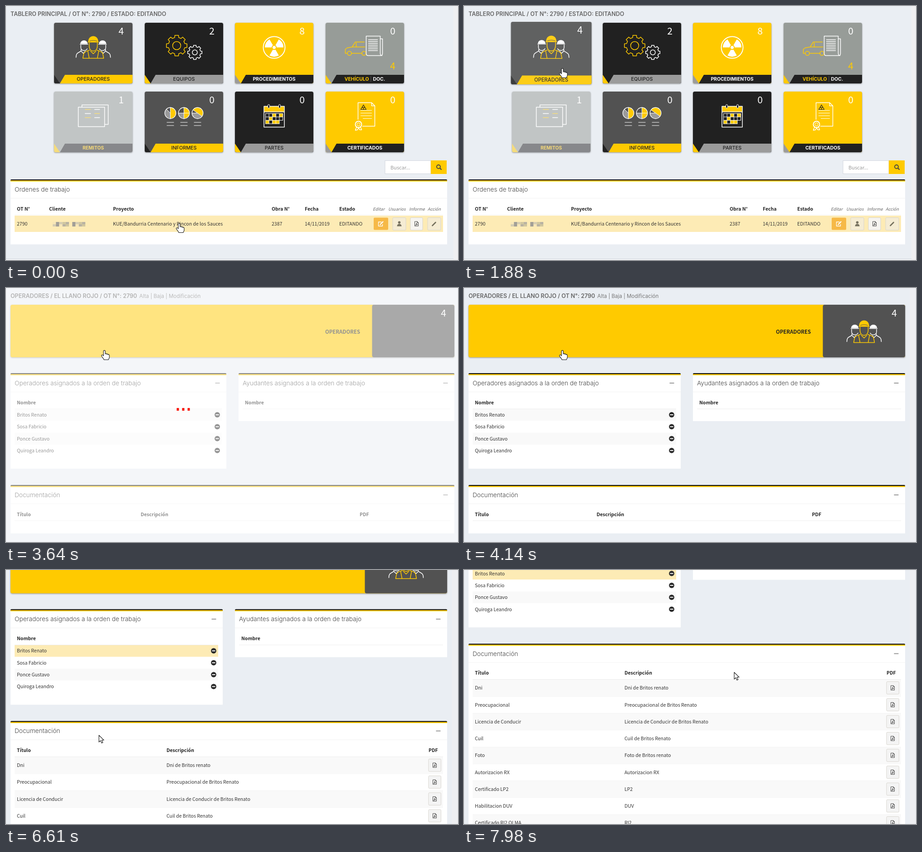
These frames come from a looping animation (997x561 px, 8000 ms). An HTML page:

```html
<!DOCTYPE html>
<html lang="es">
<head>
<meta charset="utf-8">
<title>Tablero</title>
<style>
html, body { margin: 0; width: 100%; height: 100%; overflow: hidden; background: #eaeef3; }
svg { display: block; width: 997px; height: 561px; }
text { white-space: pre; }
.s { font: 10.5px "Noto Sans CJK JP", "Noto Sans CJK SC", "Noto Sans CJK", "Open Sans", sans-serif; fill: #333; }
.b { font-weight: 700; fill: #222; }
.i { font-size: 9.4px; font-style: italic; font-weight: 500; fill: #666; }
.n { font-size: 21px; fill: #fff; text-anchor: middle; }
.o { font-size: 11.4px; }
.m { font: 300 13.7px Inter, "Open Sans", sans-serif; fill: #444; }
.h { font: 600 12.5px Inter, "Open Sans", sans-serif; fill: #666; }
.a { font: 400 11.5px Inter, "Open Sans", sans-serif; fill: #777; }
.t { font: 500 10.8px Inter, "Open Sans", sans-serif; fill: #222; text-anchor: middle; }
.w { font-size: 10.4px; font-weight: 700; }
.tile { filter: drop-shadow(0 1px 1.5px #0006); }
.line { fill: none; stroke-width: 1.5; stroke-linejoin: round; stroke-linecap: round; }
</style>
</head>
<body>
<svg id="stage" viewBox="0 0 997 561"></svg>
<script>
const YELLOW = '#ffca00', BLACK = '#212121', DARK = '#525252', GREY = '#9b9b9b', BG = '#eaeef3';
const LOOP = 8000;

const rect = (x, y, w, h, fill, more = '') =>
  `<rect x="${x}" y="${y}" width="${w}" height="${h}" fill="${fill}" ${more}/>`;
const text = (x, y, s, cls = 's', more = '') => `<text x="${x}" y="${y}" class="${cls}" ${more}>${s}</text>`;
const line = (d, color, more = '') => `<path class="line" d="${d}" stroke="${color}" ${more}/>`;
const shape = (d, fill) => `<path d="${d}" fill="${fill}"/>`;
const group = (x, y, body) => `<g transform="translate(${x} ${y})">${body}</g>`;
const circle = (x, y, r, fill, more = '') => `<circle cx="${x}" cy="${y}" r="${r}" fill="${fill}" ${more}/>`;
const ring = (x, y, r, color, width = 1.5) => circle(x, y, r, 'none', `stroke="${color}" stroke-width="${width}"`);
const polar = (x, y, r, deg) => {
  const a = deg * Math.PI / 180;
  return (x + r * Math.cos(a)).toFixed(2) + ' ' + (y + r * Math.sin(a)).toFixed(2);
};
const sector = (x, y, r, from, to, fill) =>
  shape(`M${x} ${y}L${polar(x, y, r, from)}A${r} ${r} 0 ${+(to - from > 180)} 1 ${polar(x, y, r, to)}Z`, fill);

// Icons, drawn around the icon point of a tile
function workers() {
  const side = line('M-38 22c0-7 2-9 6-11l5-3v-3M-27.500-5v5c0 4 3 7 7 7s6-2 7-4M-27 8l5 5 4-4M-29-7h17', '#fff') +
    shape('M-28.500-8c0-10 16-10 16 0z', '#fff');
  return side + `<g transform="scale(-1 1)">${side}</g>` +
    line('M-9-10v7c0 7 4 11 9 11s9-4 9-11v-7M-23 24l2-10c1-4 5-6 13-8M23 24l-2-10c-1-4-5-6-13-8' +
      'M-23 24h46M-12 8l3 16M12 8l-3 16M-6 8l6 6 6-6', YELLOW) +
    shape('M-11-13c0-16 22-16 22 0l2 2h-26z', YELLOW) + line('M-8-14q8-3 16 0', DARK, 'style="stroke-width:1"');
}

function gear(x, y, r, hole, color) {
  const points = [];
  for (let k = 0; k < 8; k++)
    for (const [da, f] of [[-14, .8], [-10, 1], [10, 1], [14, .8]]) points.push(polar(x, y, r * f, k * 45 + da));
  return line('M' + points.join('L') + 'Z', color) + ring(x, y, hole, color);
}

const trefoil = (x, y, r, fill) =>
  [-180, -60, 60].map(a => sector(x, y, r, a, a + 60, fill)).join('');

const radiation = () => ring(0, 0, 24, '#fff', 2) + trefoil(0, 0, 20.5, '#fff') +
  circle(0, 0, 5.5, YELLOW) + circle(0, 0, 3.5, '#fff');

function vehicle() {
  let rows = '';
  for (let y = -17; y < 10; y += 4) rows += `M8 ${y}h20`;
  return line('M-39 13h-4v-9l4-3 11-2 7-11h20M-28-1H0M-19-1v-9M-30 13h24', YELLOW) +
    ring(-34, 13, 4.5, YELLOW) + ring(-2, 13, 4.5, YELLOW) +
    line('M3 13v-38h31v38q0 5 4 5h-31q-4 0-4-5M34-19h5v32q0 5-4 5', '#fff') + line(rows, '#fff');
}

const notes = () => line('M-25-20v-5H33v43H25M-25-20h-8v43h58V-20z', '#fff') +
  line('M3-15h11M-18-6h12M3 3h11', '#fff') + line('M-18-15h12M3-6h11M-18 3h12', '#f5dc7c');

function pies() {
  const cuts = [[[-90, 90, YELLOW], [90, 225, GREY]], [[-90, 90, YELLOW], [90, 180, GREY]],
    [[-145, 35, YELLOW], [35, 180, GREY]]];
  const spokes = ['M-30-19.500v25M-30-7l-9-9', 'M0-19.500v25M-12-7h24', 'M20-14l20 14M30-7h-12'];
  return cuts.map((list, k) => {
    const x = 30 * (k - 1);
    return list.map(c => sector(x, -7, 12, ...c)).join('') + ring(x, -7, 12.2, '#fff', 1.4) +
      line(spokes[k], '#fff', 'style="stroke-width:1"') +
      line(`M${x - 7.5} 13.500h15M${x - 7.5} 20.500h15`, '#fff', 'style="stroke-width:1.200"');
  }).join('');
}

function calendar() {
  let cells = '', grid = '';
  for (const [c, r] of [[2, 0], [4, 0], [1, 1], [0, 2], [3, 2], [2, 2]])
    cells += rect(-19 + c * 7.6, -6 + r * 7.5, 7.6, 7.5, YELLOW);
  for (let k = 0; k < 6; k++) grid += `M${-19 + k * 7.6}-6v${k < 5 ? 22.5 : 15}`;
  for (let k = 0; k < 4; k++) grid += `M-19 ${-6 + k * 7.5}h${k < 3 ? 38 : 30.4}`;
  return rect(-22, -22, 44, 12, YELLOW) + cells +
    line('M-22.500-22h45v46h-45zM-22-9.500h44', '#fff') + line(grid, '#fff', 'style="stroke-width:1"') +
    [-12, 12].map(x => rect(x - 2, -26, 4, 8, BLACK, 'rx="2" stroke="#fff"')).join('');
}

const certificate = () => group(0, -8,
  line('M-15 15v-37H15l7 7v45H-5M15-22v7h7', '#fff') +
  line('M-9-5h24M-9 1h24M-9 7h24M-4 13h19', '#fff', 'style="stroke-width:1.100"') +
  line('M-3-17l6 10h-12z', BLACK, 'style="stroke-width:1.200"') + trefoil(-3, -10.5, 2.8, BLACK) +
  line('M-18 31l-3 8 5-1 2-5 3 5 4 0-3-8', '#fff') + circle(-14, 26, 7, YELLOW, 'stroke="#fff" stroke-width="2"') +
  ring(-14, 26, 3.5, '#fff', 1));

const pdfIcon = (x, y) => group(x, y, line('M-3.500-5h5l2.500 2.500V5h-7.500zM1.500-5v2.500h2.500M-2 3.200q2-2 2-5q.5 3.500 2.500 3.700q-2-.4-4.500 1.300', '#444', 'style="stroke-width:1"'));
const button = (x, y, w, fill) => rect(x, y, w, 27.5, fill, 'rx="2" stroke="#d8d5cf"');

// Dashboard
const TILES = [
  ['OPERADORES', 4, DARK, '#2a2a2a', YELLOW, BLACK, workers],
  ['EQUIPOS', 2, BLACK, YELLOW, GREY, BLACK, () => gear(-16, -4, 23, 9, YELLOW) + gear(24, 11, 16, 5.5, '#fff')],
  ['PROCEDIMIENTOS', 8, YELLOW, GREY, BLACK, '#fff', radiation],
  [`<tspan fill="${YELLOW}">VEHÍCULO</tspan><tspan fill="#777" font-weight="300"> | </tspan>DOC.`, 0, '#979c98', YELLOW, BLACK, '#fff', vehicle],
  ['REMITOS', 1, '#c1c5c5', '#f5dc7c', '#87888b', '#f5d978', notes],
  ['INFORMES', 0, DARK, BLACK, YELLOW, BLACK, pies],
  ['PARTES', 0, BLACK, YELLOW, GREY, BLACK, calendar],
  ['CERTIFICADOS', 0, YELLOW, GREY, BLACK, '#fff', certificate]
];

function tile([name, count, body, corner, band, ink, icon], k) {
  const bold = ink !== BLACK ? 't w' : 't';
  const inner = `<g clip-path="url(#round)">${rect(0, 0, 173, 134, body)}` +
    shape('M0 115l13 19H0z', corner) + shape('M24 115h149v19H13z', band) + '</g>' +
    group(86.5, 54.5, icon()) + text(148, 25.5, count, 's n') +
    (k === 3 ? text(148, 102.5, 4, 's n', `style="fill:${YELLOW}"`) : '') +
    text(86.5, 128, name, bold, `style="fill:${ink}"`);
  return group(Math.round(106.3 + k % 4 * 199.4), k < 4 ? 37 : 189, `<g id="tile${k}" class="tile">${inner}</g>`);
}

function panel(x, y, w, h, title, fold = true) {
  return rect(x, y, w, 8, '#111', 'rx="2"') + rect(x, y + 2.2, w, 5, YELLOW) + rect(x, y + 4.6, w, h - 4.6, '#fff') +
    text(x + 9, y + 27, title, 'm') + rect(x, y + 41, w, 1, '#f2f2f2') +
    (fold ? rect(x + w - 24.5, y + 21, 10, 2, '#999') : '');
}

function client() {
  const tones = ['#f6e6b8', '#d5cdb2', '#b9b3a2', '#a29f97', '#d0c69f'];
  let out = '';
  for (let k = 0; k < 10; k++) if (k !== 5) {
    out += rect(103 + k * 7.2, 477, 7.2, 5, tones[k * 3 % 5]) + rect(103 + k * 7.2, 482, 7.2, 5, tones[(k * 2 + 1) % 5]);
  }
  return out;
}

function dashboard() {
  const heads = [['OT N°', 24], ['Cliente', 95], ['Proyecto', 236], ['Obra N°', 586], ['Fecha', 659], ['Estado', 735]];
  const actions = [['Editar', 809], ['Usuarios', 843], ['Informe', 889], ['Acción', 930]];
  const cells = [['2790', 24], ['KUE/Bandurria Centenario y Rincon de los Sauces', 236], ['2387', 586], ['14/11/2019', 659], ['EDITANDO', 735]];
  return rect(0, 558, 987, 1, '#cfd4dc') + rect(0, 559, 987, 2, '#f6f8fa') + rect(987, 0, 10, 561, '#efeff1') +
    text(10, 21.5, 'TABLERO PRINCIPAL / OT N°: 2790 / ESTADO: EDITANDO', 'h') +
    TILES.map(tile).join('') +
    rect(836, 341.5, 101, 29, '#fff', 'stroke="#d2d6de"') + text(848, 360.5, 'Buscar...', 's', 'style="font-size:11px;fill:#999"') +
    rect(937, 341, 35, 30, YELLOW) + line('M957.500 358.500l2.500 2.500', '#444', 'style="stroke-width:2.200"') +
    ring(954, 355, 4, '#444', 1.8) +
    panel(10, 383, 963, 143.5, 'Ordenes de trabajo', false) +
    heads.map(([s, x]) => text(x, 452, s, 's b')).join('') + actions.map(([s, x]) => text(x, 452, s, 's i')).join('') +
    rect(19, 461, 945, 1, '#f4f4f4') + rect(19, 463, 945, 36, '#fdebb5') +
    cells.map(([s, x]) => text(x, 485, s)).join('') + client() +
    rect(811, 467.5, 32, 27, '#f6b947', 'rx="2"') +
    line('M828 477h-6.500v9h9v-4', '#fff', 'style="stroke-width:1.300"') + line('M825.500 482.500l6-6', '#fff', 'style="stroke-width:2.200"') +
    button(853, 467.5, 29, '#f5ecd3') + circle(867.5, 478, 2.8, '#77725f') + shape('M862.500 486.500c0-7 10-7 10 0z', '#77725f') +
    button(892, 467.5, 27, '#f6f4f0') + pdfIcon(905.5, 481) +
    button(930, 467.5, 29, '#f5ecd3') + line('M940.500 485l7-7', '#77725f', 'style="stroke-width:2.800"');
}

// Operators page
const PEOPLE = ['Britos Renato', 'Sosa Fabricio', 'Ponce Gustavo', 'Quiroga Leandro'];
const DOCS = [['Dni', 'Dni de Britos renato'], ['Preocupacional', 'Preocupacional de Britos Renato'],
  ['Licencia de Conducir', 'Licencia de Conducir de Britos Renato'], ['Cuil', 'Cuil de Britos Renato'],
  ['Foto', 'Foto de Britos renato'], ['Autorizacion RX', 'Autorizacion RX'], ['Certificado LP2', 'LP2'],
  ['Habilitacion DUV', 'DUV'], ['Certificado RI2 OLMA', 'RI2']];
const PERSON_H = 26.3, DOC_H = 37.25, PERSON_Y = 267, DOC_Y = 514;

const docHead = (right, desc, pdf) => text(24, 503.5, 'Título', 's b') + text(desc, 503.5, 'Descripción', 's b') +
  text(pdf, 503.5, 'PDF', 's b') + rect(19, 513.5, right - 28, 1, '#eee');

function operators(right, id) {
  const w = (right - 37) / 2, x2 = right - w;
  const rows = PEOPLE.map((name, k) => {
    const y = PERSON_Y + k * PERSON_H, mid = y + 13;
    return rect(19, y, w - 19, PERSON_H, '#fff', `id="${id}p${k}"`) + text(24, mid + 4, name) +
      circle(w - 10, mid, 5.9, '#2a2a2a') + rect(w - 13.5, mid - 1, 7, 2, '#fff');
  }).join('');
  return text(10, 21.5, 'OPERADORES / EL LLANO ROJO / OT N°: 2790', 'h') + text(294, 21.5, 'Alta | Baja | Modificación', 'a') +
    `<g class="tile">${rect(10, 37, right - 10, 116, YELLOW, 'rx="4"')}${rect(right - 181.5, 37, 181.5, 116, DARK, 'rx="4"')}</g>` +
    text(right - 285, 101, 'OPERADORES', 's b o') + text(right - 24, 62.5, 4, 's n', 'style="font-weight:500"') +
    panel(10, 188, w, 211, 'Operadores asignados a la orden de trabajo') + text(24, 257, 'Nombre', 's b') +
    rows + rect(19, 266.5, w - 19, 1, '#eee') +
    panel(x2, 188, w, 106, 'Ayudantes asignados a la orden de trabajo') + text(x2 + 14, 257, 'Nombre', 's b') +
    rect(x2 + 9, 266.5, w - 18, 1, '#eee');
}

function emptyDocs(right) {
  const k = (right - 28) / 961;
  return panel(10, 435, right - 10, 107, 'Documentación') + docHead(right, 24 + 273 * k, 24 + 756 * k);
}

const fullDocs = () => panel(10, 435, 963, 450, 'Documentación') + DOCS.map(([title, desc], k) => {
  const y = DOC_Y + k * DOC_H, mid = y + 18.6;
  return rect(19, y, 945, DOC_H, '#fff', `id="d${k}"`) + rect(19, y, 945, .7, '#f1f1f1') +
    text(24, mid + 4, title) + text(354, mid + 4, desc) + button(932, mid - 13.7, 27.5, '#f4f4f4') + pdfIcon(945.5, mid);
}).join('') + docHead(973, 354, 932);

const HAND = 'M-2 1.500C-2-.7 2-.7 2 1.500V8C2 6 5 6 5 8.500C5 7 8 7 8 9.500C8.500 8 11 8.500 11 11V15C11 18 9 18 9 20.500H-1C-1 18-6 14-6.500 11.500C-6.500 9-3 9-2 12Z';
const ARROW = 'M0 0V15L3.500 11.800L6 17.200L8.600 16L6.200 10.800H11Z';

const $ = id => document.getElementById(id);
$('stage').innerHTML = '<clipPath id="round"><rect width="173" height="134" rx="4"/></clipPath>' + rect(0, 0, 997, 561, BG) +
  `<g id="home">${dashboard()}</g>` +
  `<g id="loading">${operators(989, 'a')}${emptyDocs(989)}</g>` +
  `<g id="ready">${rect(983, 0, 14, 561, '#eeeff2')}<g id="scroll">${operators(973, 'b')}${group(882.5, 96.5, workers())}` +
  `<g id="empty">${emptyDocs(973)}</g><g id="docs">${fullDocs()}</g></g></g>` +
  rect(0, 0, 997, 561, '#fff', 'id="veil"') + rect(0, 0, 997, 561, '#f6f8fb', 'id="blank"') +
  `<g id="dots">${[376.5, 388.5, 400.5].map(x => rect(x, 265, 5, 6, '#f8190c')).join('')}</g>` +
  '<path id="cursor" fill="#fff" stroke="#111" stroke-width="1.1" stroke-linejoin="round"/>';

// Motion: time followed by values
const CURSOR = [[270, 382, 480], [1050, 232, 166], [1880, 217, 138], [4290, 217, 138], [4900, 191, 278], [6050, 191, 278],
  [6400, 205, 365], [6610, 205, 365], [6870, 205, 382], [7150, 205, 382], [7700, 570, 392], [7980, 596, 226]];
const SCROLL = [[6350, 0], [6610, 101.5], [6870, 187], [6940, 187], [7200, 272.3]];
const ramp = (t, from, to) => Math.min(1, Math.max(0, (t - from) / (to - from)));

function track(keys, t) {
  const next = keys.findIndex(k => k[0] > t);
  if (next < 0) return keys[keys.length - 1].slice(1);
  if (!next) return keys[0].slice(1);
  const a = keys[next - 1], b = keys[next], p = ramp(t, a[0], b[0]), e = p * p * (3 - 2 * p);
  return a.slice(1).map((v, k) => v + (b[k + 1] - v) * e);
}

const show = (id, on) => $(id).style.display = on ? '' : 'none';

function render(t) {
  const [x, y] = track(CURSOR, t), [scroll] = track(SCROLL, t);
  const home = t < 2700, blank = !home && t < 3640, ready = t >= 3960, docs = t >= 5560;
  show('home', home);
  show('blank', blank);
  show('loading', !home && !ready);
  show('ready', ready);
  show('empty', !docs);
  show('docs', docs);
  $('scroll').setAttribute('transform', `translate(0 ${-scroll})`);

  const zoom = ramp(t, 1060, 1280);
  $('tile0').setAttribute('transform', `translate(86.5 67) scale(${1 + .03 * zoom}) translate(-86.5 -67)`);
  $('tile0').style.opacity = 1 - .1 * zoom;

  const busy = t >= 3640 && t < 4140;
  $('veil').setAttribute('opacity', busy ? .5 * (1 - ramp(t, 3980, 4140)) : 0);
  show('dots', busy);
  [...$('dots').children].forEach((dot, k) => {
    const h = 6 + 5 * Math.max(0, Math.sin((t - 3760 - k * 90) / 90)) * (t > 3760 + k * 90);
    dot.setAttribute('height', h);
    dot.setAttribute('y', 268 - h / 2);
    dot.setAttribute('opacity', 1 - ramp(t, 4040, 4140));
  });

  const moved = t > 4290, py = y + scroll;
  const person = moved && x < 468 ? Math.floor((py - PERSON_Y) / PERSON_H) : -1;
  const doc = docs ? Math.floor((py - DOC_Y) / DOC_H) : -1;
  const tone = (k, hover) => k === hover ? '#f3f5f5' : k % 2 ? '#fff' : '#f9f9f9';
  PEOPLE.forEach((_, k) => {
    $('ap' + k).setAttribute('fill', tone(k, -1));
    $('bp' + k).setAttribute('fill', !k && t >= 5400 ? '#fdebb5' : tone(k, person));
  });
  DOCS.forEach((_, k) => $('d' + k).setAttribute('fill', tone(k, doc)));

  const onTile = x > 106 && x < 279 && (y < 172 || y > 189 && y < 322);
  const hand = home ? y > 462 || onTile : !moved || person >= 0 && person < PEOPLE.length;
  $('cursor').setAttribute('d', hand ? HAND : ARROW);
  $('cursor').setAttribute('transform', `translate(${x} ${y})`);
}

const start = performance.now();
function tick() {
  render((performance.now() - start) % LOOP);
  requestAnimationFrame(tick);
}
tick();
</script>
</body>
</html>
```
